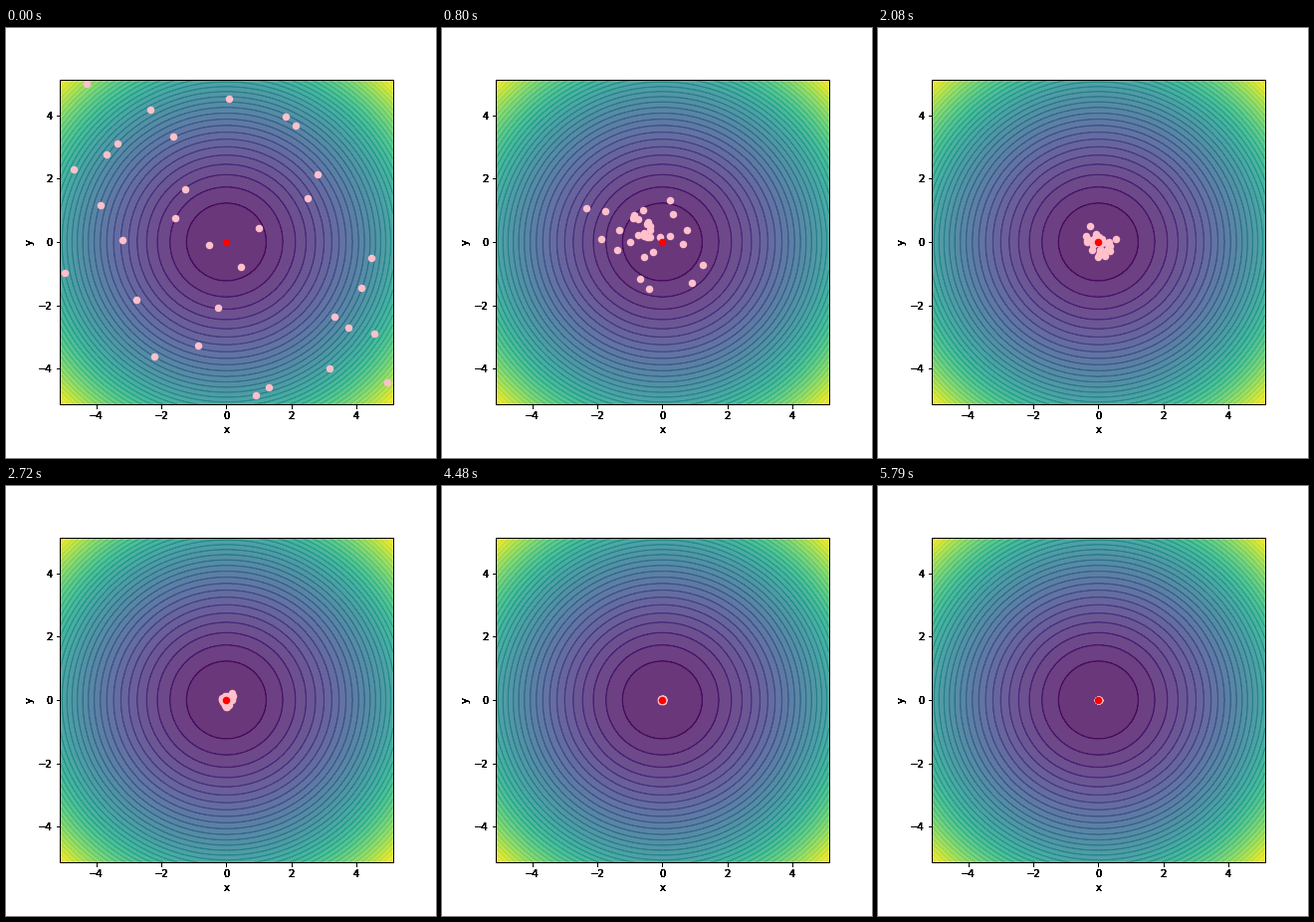
These frames come from a looping animation (432x432 px, 8000 ms). A matplotlib script:

```python
import numpy as np
import matplotlib.pyplot as plt
from matplotlib.animation import FuncAnimation

SIZE, DPI = 432, 72
LIMIT = 5.12
FRAMES, INTERVAL = 50, 160
BOX = [0.125, 0.125, 0.775, 0.755]
COUNT = 32
DECAY = 0.17                # shrink rate of the swarm per step
LEAN = (-0.45, 0.2)         # brief shift of the swarm while it gathers

rng = np.random.default_rng(4)
plt.rcParams.update({"font.family": "DejaVu Sans", "font.size": 10})

# One particle per row and column of a COUNT x COUNT grid covers the area evenly.
cells = np.column_stack([rng.permutation(COUNT) for _ in range(2)])
start = LIMIT * (2 * (cells + rng.random(cells.shape)) / COUNT - 1)
swing = rng.uniform(0, 0.35, start.shape)


def positions(step):
    """Each particle swings about the optimum while its reach decays."""
    orbit = start * np.exp(-DECAY * step) * np.cos(swing * step)
    return orbit + np.array(LEAN) * np.exp(-((step - 5) / 2) ** 2)


fig = plt.figure(figsize=(SIZE / DPI, SIZE / DPI), dpi=DPI, facecolor="white")


def add_axes(label):
    ax = fig.add_axes(BOX, label=label, facecolor="none")
    ax.set(xlim=(-LIMIT, LIMIT), ylim=(-LIMIT, LIMIT), xlabel="x", ylabel="y",
           xticks=range(-4, 5, 2), yticks=range(-4, 5, 2))
    return ax


ax = add_axes("main")
# Repeated axes darken the soft edges of text and ticks.
for i in range(6):
    add_axes(f"overlay {i}")

grid = np.linspace(-LIMIT, LIMIT, 201)
X, Y = np.meshgrid(grid, grid)
Z = X**2 + Y**2
levels = np.arange(0, 53, 1.5)
ax.contourf(X, Y, Z, levels, cmap="viridis", alpha=0.8)
ax.contour(X, Y, Z, levels, cmap="viridis", linewidths=1.2)
ax.set(xlim=(-LIMIT, LIMIT), ylim=(-LIMIT, LIMIT))

particles = ax.scatter(*start.T, s=36, color="pink", linewidths=1.5, zorder=2.2)
ax.scatter(0, 0, s=36, color="red", linewidths=1.5, zorder=2.3)


def update(step):
    particles.set_offsets(positions(step))
    return [particles]


anim = FuncAnimation(fig, update, frames=FRAMES, interval=INTERVAL,
                     repeat=True, repeat_delay=0, blit=False)
plt.show()
```
